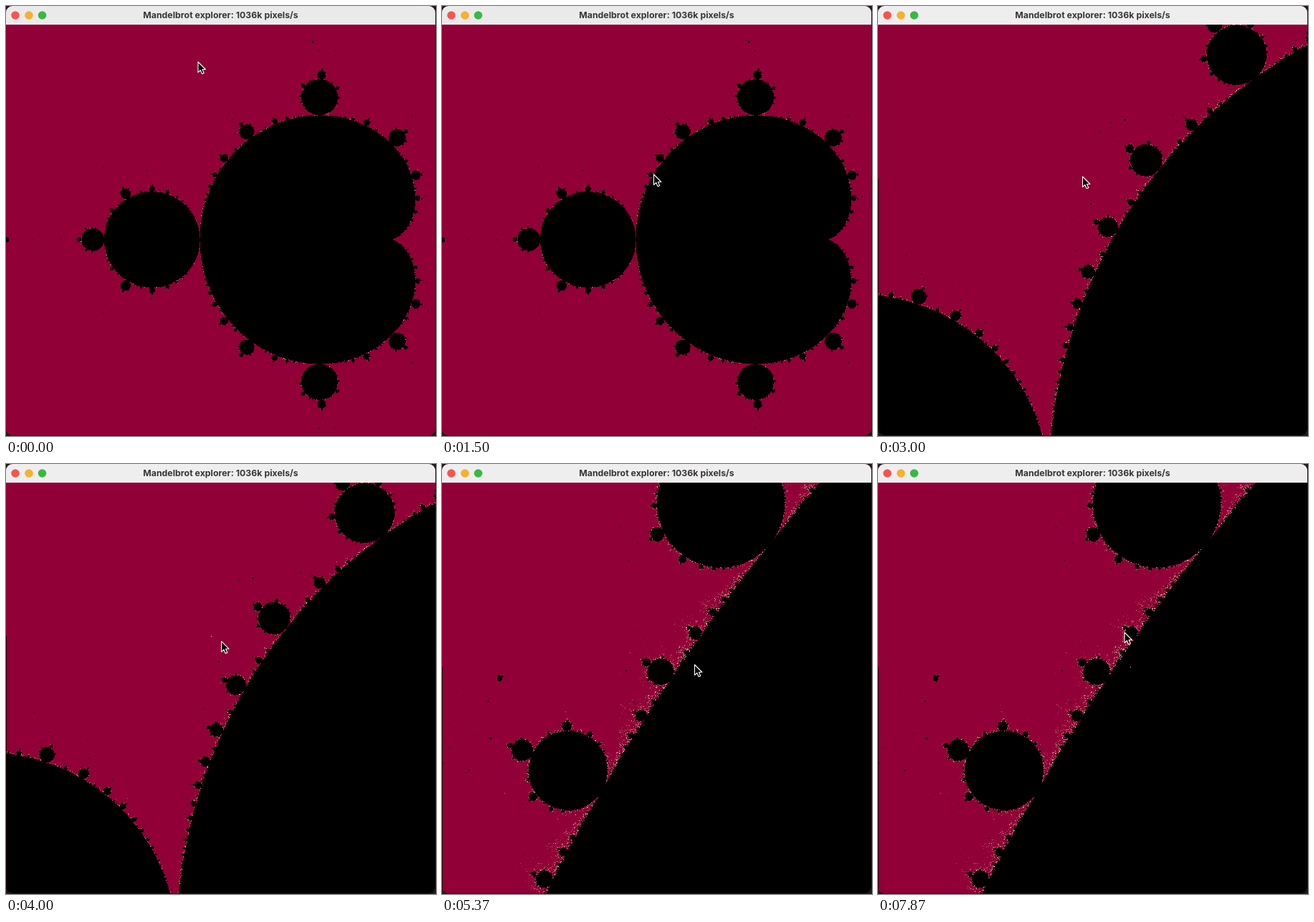
An HTML page with a canvas for the animation above (8000 ms loop, 600x600 px).

```html
<!DOCTYPE html>
<html lang="en">
<head>
<meta charset="utf-8">
<title>Mandelbrot explorer</title>
<style>
  html, body { margin: 0; width: 100%; height: 100%; overflow: hidden; background: #1c1c1c; }
  #win { position: absolute; left: 0; top: 0; width: 599px; height: 599px; overflow: hidden; border-radius: 9px; background: #910036; }
  canvas { position: absolute; left: 0; top: 0; visibility: hidden; }
  svg { position: absolute; left: 0; top: 0; }
  text { font: 700 12.35px Inter, sans-serif; fill: #383537; text-anchor: middle; }
</style>
</head>
<body>
<div id="win"></div>
<svg width="600" height="600" viewBox="0 0 600 600">
  <path id="bar" d="M0 26V9A9 9 0 0 1 9 0H590A9 9 0 0 1 599 9V26Z"/>
  <circle cx="13" cy="13" r="5.8" fill="#f4564d"/>
  <circle cx="32" cy="13" r="5.8" fill="#f5b12f"/>
  <circle cx="50.5" cy="13" r="5.8" fill="#37b943"/>
  <text x="299.5" y="17.3">Mandelbrot explorer: 1036k pixels/s</text>
  <path id="cursor" d="M0 0V14.6L3.3 11.5L5.6 16.8L8.2 15.7L6 10.5H10.4Z" fill="#000" stroke="#fff" stroke-width="1.1" stroke-linejoin="round"/>
</svg>
<script>
const LOOP = 8000, W = 599, H = 600, TOP = 26, ZOOM = 4;
const CENTRE = { x: 300, y: 326 };
const LIMIT = 2000, GLOW_FROM = 600;
const BASE = [145, 0, 54], GLOW = [255, 224, 190];

// (ox, oy) is where the point -0.75 + 0i lies on the stage
const home = { start: 0, scale: 267, ox: 270.55, oy: 325.9 };
const near = zoomInto(home, 3000, 286, 240);
const close = zoomInto(near, 5370, 352, 283);
const views = [home, near, close];

// The pointer rests between these moves
const origin = { x: 268, y: 78 };
const moves = [
  { from: 250, to: 1500, x: 295.5, y: 235 },
  { from: 1875, to: 2375, x: 285.5, y: 238 },
  { from: 3500, to: 5125, x: 352.5, y: 280 },
  { from: 5625, to: 6500, x: 354.5, y: 251 },
  { from: 6625, to: 7625, x: 344, y: 235 }
];

// The clicked point moves to the centre
function zoomInto(view, start, x, y) {
  return {
    start,
    scale: view.scale * ZOOM,
    ox: CENTRE.x + (view.ox - x) * ZOOM,
    oy: CENTRE.y + (view.oy - y) * ZOOM,
    click: { x, y }
  };
}

function escapeTime(a, b) {
  const b2 = b * b, p = a - 0.25, q = p * p + b2;
  const inCardioid = q * (q + p) <= b2 / 4;
  const inDisc = (a + 1) * (a + 1) + b2 <= 1 / 16;
  if (inCardioid || inDisc) return LIMIT;
  let x = 0, y = 0, px = 0, py = 0, mark = 8;
  for (let n = 0; n < LIMIT; n++) {
    const xx = x * x, yy = y * y;
    if (xx + yy > 4) return n;
    y = 2 * x * y + b;
    x = xx - yy + a;
    if (Math.abs(x - px) + Math.abs(y - py) < 1e-13) return LIMIT;
    if (n === mark) { px = x; py = y; mark *= 2; }
  }
  return LIMIT;
}

function colour(n) {
  if (n >= LIMIT) return [0, 0, 0];
  if (n < GLOW_FROM) return BASE;
  const f = (n - GLOW_FROM) / (LIMIT - GLOW_FROM);
  return BASE.map((v, k) => v + (GLOW[k] - v) * f);
}

function drawView(view) {
  const canvas = document.createElement('canvas');
  canvas.width = W;
  canvas.height = H;
  const ctx = canvas.getContext('2d');
  const img = ctx.createImageData(W, H);
  for (let y = TOP; y < H; y++) {
    const im = (view.oy - y - 0.5) / view.scale;
    for (let x = 0; x < W; x++) {
      const re = -0.75 + (x + 0.5 - view.ox) / view.scale;
      img.data.set([...colour(escapeTime(re, im)), 255], (y * W + x) * 4);
    }
  }
  ctx.putImageData(img, 0, 0);
  if (view.click) {
    const { x, y } = view.click;
    ctx.fillStyle = '#200';
    ctx.fillRect(0, y, 1, H - y);
    ctx.fillStyle = '#f4e6c8';
    ctx.fillRect(x, y, 1, 1);
  }
  document.getElementById('win').append(canvas);
  return canvas;
}

function pointerAt(t) {
  let { x, y } = origin;
  for (const m of moves) {
    const u = Math.min(1, Math.max(0, (t - m.from) / (m.to - m.from)));
    const e = u * u * (3 - 2 * u);
    x += (m.x - x) * e;
    y += (m.y - y) * e;
  }
  return [x, y];
}

const layers = views.map(drawView);
const bar = document.getElementById('bar');
const cursor = document.getElementById('cursor');

function render(ms) {
  const t = ms % LOOP;
  const tick = Math.floor((t + 5) / 125) * 125 % LOOP;
  const current = views.filter(v => t >= v.start).length - 1;
  layers.forEach((c, i) => { c.style.visibility = i === current ? 'visible' : 'hidden'; });
  bar.setAttribute('fill', current ? '#efeeef' : '#ebeaeb');
  cursor.setAttribute('transform', `translate(${pointerAt(tick)})`);
}

const begin = performance.now();
function loop() {
  render(performance.now() - begin);
  requestAnimationFrame(loop);
}
loop();
</script>
</body>
</html>
```
